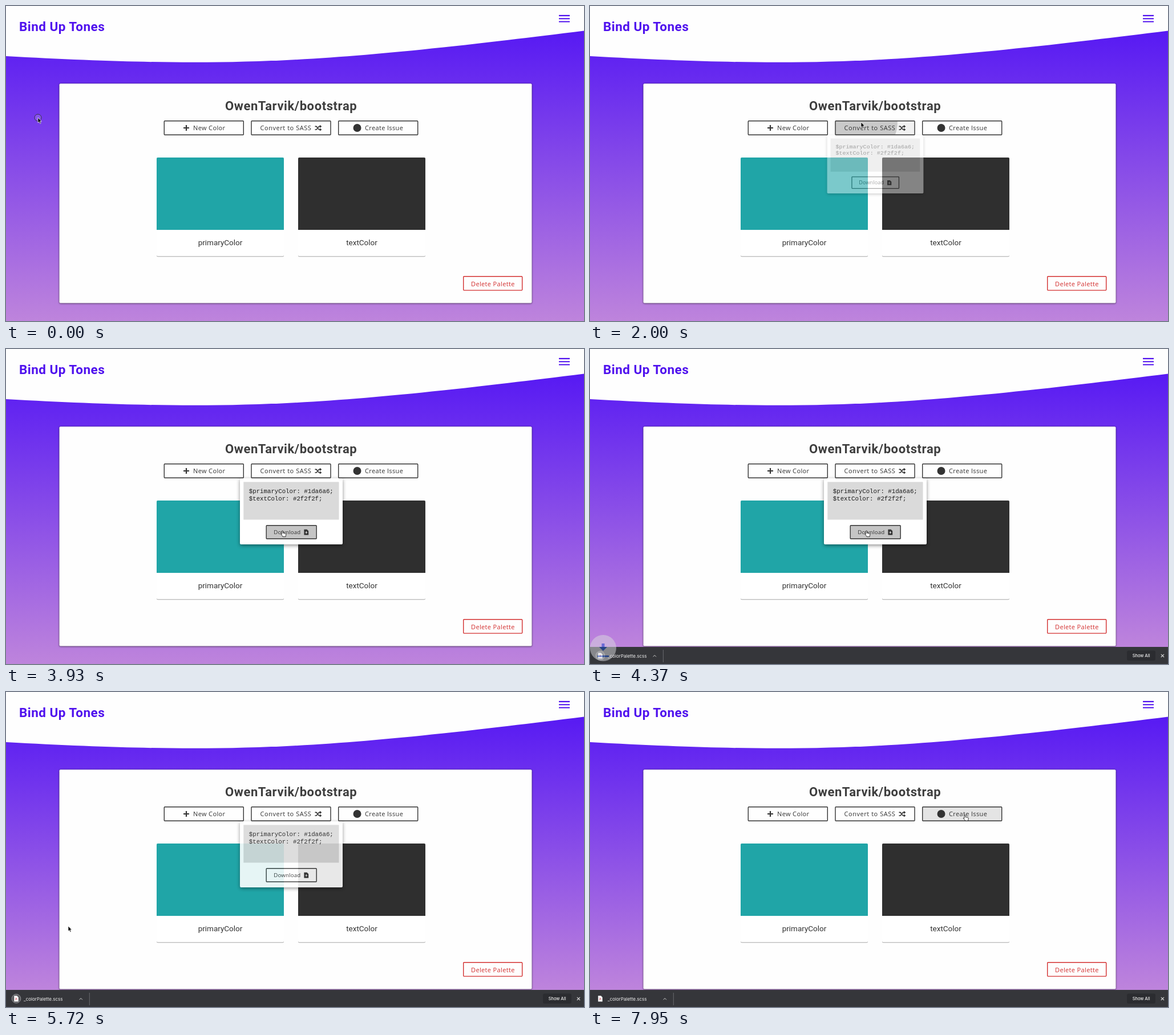
Animation, 1013 px wide and 553 px high, one loop 8000 ms. Source, as an HTML page:

```html
<!DOCTYPE html>
<html lang="en">
<head>
<meta charset="utf-8">
<title>Palette</title>
<style>
  html, body { margin: 0; height: 100%; overflow: hidden; background: #fff; }
  svg { display: block; }
  #stage { width: 100vw; height: 100vh; }
  text { white-space: pre; }
  .head { font: 700 22px Roboto, sans-serif; }
  .label { font: 11px "Open Sans", sans-serif; letter-spacing: .36px; fill: #333; }
  .name { font: 13.5px Roboto, sans-serif; fill: #333; text-anchor: middle; }
  .code { font: 10.72px "Liberation Mono", monospace; fill: #1c1c1c; }
  .shelf { font: 8px Inter, sans-serif; fill: #f1f1f1; }
  .frame { fill: none; stroke: #333; stroke-width: 1.4; }
  .line { fill: none; stroke: #333; }
  .panel { fill: #fefefe; filter: drop-shadow(0 0 .8px rgba(0,0,0,.35)) drop-shadow(0 1px 1.5px rgba(0,0,0,.4)); }
  .tile { fill: #fff; filter: drop-shadow(0 0 .5px rgba(0,0,0,.25)) drop-shadow(0 1px .6px rgba(0,0,0,.3)); }
</style>
</head>
<body>
<svg id="stage" viewBox="0 0 1013 553" preserveAspectRatio="none">
  <defs>
    <linearGradient id="sky" x2="0" y2="1">
      <stop stop-color="#4e10f5"/><stop offset="1" stop-color="#be84dc"/>
    </linearGradient>
  </defs>

  <rect id="back" width="1013" height="553" fill="url(#sky)"/>
  <path d="M0 0V88C400 110 560 100 1013 43.5V0Z" fill="#fefefe"/>
  <text class="head" x="23" y="43.5" fill="#4f10ee" style="font-size:22.5px;letter-spacing:.45px">Bind Up Tones</text>
  <path d="M969 16.9h19m-19 5.3h19m-19 5.3h19" stroke="#4f10ee" stroke-width="2.1"/>

  <rect class="panel" x="93.5" y="136.3" width="828" height="385.2" rx="2"/>
  <text class="head" x="499.6" y="183" fill="#3e3e3e" text-anchor="middle" style="letter-spacing:.58px">OwenTarvik/bootstrap</text>

  <g id="row"></g>
  <path d="M311 214h10m-5-5v10" stroke="#333" stroke-width="2.2"/>
  <text class="label" x="328" y="218">New Color</text>
  <text class="label" x="445.5" y="218" style="letter-spacing:.55px">Convert to SASS</text>
  <path class="line" stroke-width="1.6" d="M541.5 211.4h2.4l4.8 5.6h2m-9.2 0h2.4l4.8-5.6h2"/>
  <path d="M550 208.8l3.4 2.6l-3.4 2.6zm0 5.6l3.4 2.6l-3.4 2.6z" fill="#333"/>
  <circle cx="615.5" cy="214" r="7" fill="#333"/>
  <text class="label" x="629" y="218">Create Issue</text>

  <g id="tiles"></g>

  <rect class="frame" x="801.7" y="474.7" width="103" height="24.4" rx="1" style="stroke:#d32f2f"/>
  <text class="label" x="815" y="491.5" style="fill:#d32f2f">Delete Palette</text>

  <g id="popup">
    <rect x="410" y="227" width="180" height="116" rx="2" fill="#fff" style="filter:drop-shadow(0 2px 3px rgba(0,0,0,.45))"/>
    <rect x="416.3" y="233.4" width="167.2" height="66.2" fill="#dadada"/>
    <text class="code" x="425.8" y="253">$primaryColor: #1da6a6;</text>
    <text class="code" x="425.8" y="265.6">$textColor: #2f2f2f;</text>
    <g id="foot"></g>
    <text class="label" x="469.3" y="325.3" style="font-size:9.7px;letter-spacing:.15px">Download</text>
    <path d="M522.4 316.8h5l2.8 2.8v6.8h-7.8z" fill="#333"/>
    <path d="M526.3 319.8v3.4m-1.8-1.4l1.8 1.8l1.8-1.8" class="line" style="stroke:#fff"/>
  </g>

  <g id="shelf">
    <rect y="523" width="1013" height="30" fill="#35363a"/>
    <circle id="busy" cx="18" cy="538.3" r="7.8" fill="#55565a" stroke="#929397"/>
    <path d="M14.2 533.3h5l2.6 2.6v7.6h-7.6z" fill="#f6f6f6"/>
    <path d="M16.5 540.8l2-3.5m-2 0l3 2.6" stroke="#d8495a" stroke-width=".9"/>
    <text class="shelf" x="31" y="541.6">_colorPalette.scss</text>
    <g id="edge">
      <path d="M-17.5 540.3l2.7-2.7l2.7 2.7" fill="none" stroke="#d0d0d0"/>
      <path d="M.3 528v22" stroke="#6b6c70"/>
    </g>
    <rect x="941" y="529.5" width="50" height="17.5" rx="3" fill="#2b2c30"/>
    <text class="shelf" x="966" y="541.2" text-anchor="middle" style="font-size:7.4px;font-weight:500">Show All</text>
    <path d="M1000.8 535.8l5.2 5.2m0-5.2l-5.2 5.2" stroke="#d8d8d8" stroke-width="1.1"/>
  </g>

  <g id="drop">
    <circle r="23" fill="#d9d9de"/>
    <path d="M-2.5-8h5v6h4.5L0 5l-7-7h4.5zM-10 13h20v2.6h-20z" fill="#1b50d0"/>
  </g>

  <circle id="ring" r="6" fill="#fff" fill-opacity=".15" stroke="#333" stroke-width=".9"/>
  <path id="arrow" d="M0 0V9L2.1 7.2L3.6 10.4L5.1 9.7L3.7 6.6H6.4Z" fill="#000" stroke="#fff" stroke-width=".7"/>
  <path id="hand" d="M-1 1q0-1 1-1t1 1v3l4 .8q1.5.4 1.3 2l-.6 2.6v1.2h-5.2v-1L-2.7 6.6q-.3-1.3 1-.8l.7.5z" fill="#fff" stroke="#222" stroke-width=".9"/>
</svg>
<script>
const $ = id => document.getElementById(id);
const add = (id, markup) => $(id).insertAdjacentHTML("beforeend", markup);
const fade = (id, value) => $(id).setAttribute("opacity", Number(value));
const move = (id, x, y) => $(id).setAttribute("transform", `translate(${x} ${y})`);

// 0 before a, 1 after b, linear between.
const ramp = (t, a, b) => Math.min(1, Math.max(0, (t - a) / (b - a)));

// Hover lasts from `enter` to `leave`, the ripple from `click` to `release`.
const buttons = [
  { id: "sass", enter: 1250, leave: 1990, tint: .05, click: 1690, release: 2140, dark: .165 },
  { id: "load", enter: 3030, leave: 5112, tint: .11, click: 3620, release: 4520, dark: .135 },
  { id: "issue", enter: 6747, leave: 8000, tint: .03, click: 7485, release: 8000, dark: .075 }
];
// Each move: start, end, and the place reached.
const moves = [
  { a: 650, b: 1397, x: 475, y: 204 },
  { a: 1992, b: 2437, x: 481, y: 292 },
  { a: 2883, b: 3180, x: 484.5, y: 319 },
  { a: 5112, b: 5706, x: 109, y: 411 },
  { a: 5856, b: 6301, x: 633.5, y: 350 },
  { a: 6301, b: 6895, x: 657, y: 215.5 }
];
const tiles = [
  { x: 264, name: "primaryColor", color: "#20a5a7" },
  { x: 512, name: "textColor", color: "#2f2f2f" }
];
const openAt = 1843, closeAt = 5558, closed = 6004;
const clicks = [0, closeAt, ...buttons.map(b => b.click)];

function cursor(t) {
  const p = { x: 56, y: 196 };
  for (const m of moves) {
    const k = ramp(t, m.a, m.b);
    p.x += (m.x - p.x) * k;
    p.y += (m.y - p.y) * k;
  }
  return p;
}
function overTile(tile, t) {
  const { x, y } = cursor(t);
  return t > closed && x > tile.x && x < tile.x + 223 && y > 266 && y < 439;
}

function addButton(group, id, x, y, w, h) {
  add(group, `
    <svg x="${x}" y="${y}" width="${w}" height="${h}">
      <rect id="${id}Tint" width="${w}" height="${h}" opacity="0"/>
      <circle id="${id}Wave" opacity="0"/>
    </svg>
    <rect class="frame" x="${x}" y="${y}" width="${w}" height="${h}" rx="1"/>`);
  const b = buttons.find(b => b.id === id);
  if (!b) return;
  const p = cursor(b.click);
  move(id + "Wave", p.x - x, p.y - y);
}
["new", "sass", "issue"].forEach((id, i) => addButton("row", id, 277.3 + 152.7 * i, 201.8, 139, 24.4));
addButton("foot", "load", 456.2, 309.8, 88, 23.4);

for (const { x, name, color } of tiles) add("tiles", `
  <rect class="tile" x="${x}" y="266" width="223" height="173.3" rx="2"/>
  <path d="M${x} 393V268q0-2 2-2h219q2 0 2 2v125z" fill="${color}"/>
  <text class="name" x="${x + 111.5}" y="420">${name}</text>
  <g id="${name}" transform="translate(${x + 208} 280.5)" stroke="#fff">
    <circle r="9.8" fill="#fff" fill-opacity=".38" stroke-width="2"/>
    <path d="M-3.2-3.2l6.4 6.4m0-6.4l-6.4 6.4" stroke-width="2.3"/>
  </g>`);

function draw(now) {
  const t = 60 + Math.floor((now % 8000 - 55) / 148.6) * 148.6;

  for (const b of buttons) {
    fade(b.id + "Tint", b.tint * (ramp(t, b.enter, b.enter + 150) - ramp(t, b.leave, b.leave + 150)));
    fade(b.id + "Wave", b.dark * ((t >= b.click) - ramp(t, b.release, b.release + 290)));
    $(b.id + "Wave").setAttribute("r", 8 + .185 * Math.max(0, t - b.click));
  }
  for (const tile of tiles) fade(tile.name, overTile(tile, t - 149));

  const open = ramp(t, openAt, openAt + 297);
  const s = 1 - .25 * (1 - open) ** 2;
  fade("popup", open ** 1.3 - ramp(t, closeAt, closed) ** 2);
  $("popup").setAttribute("transform", `translate(500 227) scale(${s} ${s * s}) translate(-500 -227)`);

  const sink = 30 * (1 - ramp(t, 3923, 4220));
  move("shelf", 0, sink);
  $("back").setAttribute("height", 523 + sink);
  move("edge", 110 + 36 * ramp(t, 4220, 4518), 0);
  fade("busy", t < 6590);

  const fall = ramp(t, 3923, 4666);
  move("drop", 23, 450 + 125 * fall);
  fade("drop", .53 * Math.sin(Math.PI * fall));

  const { x, y } = cursor(t);
  const hand = buttons.some(b => t > b.enter && t < b.leave) || tiles.some(tile => overTile(tile, t));
  for (const id of ["arrow", "hand", "ring"]) move(id, x, y);
  fade("hand", hand);
  fade("arrow", !hand);
  fade("ring", clicks.some(c => Math.abs(t - c) < 100));
}
function loop() {
  draw(performance.now());
  requestAnimationFrame(loop);
}
loop();
</script>
</body>
</html>
```
